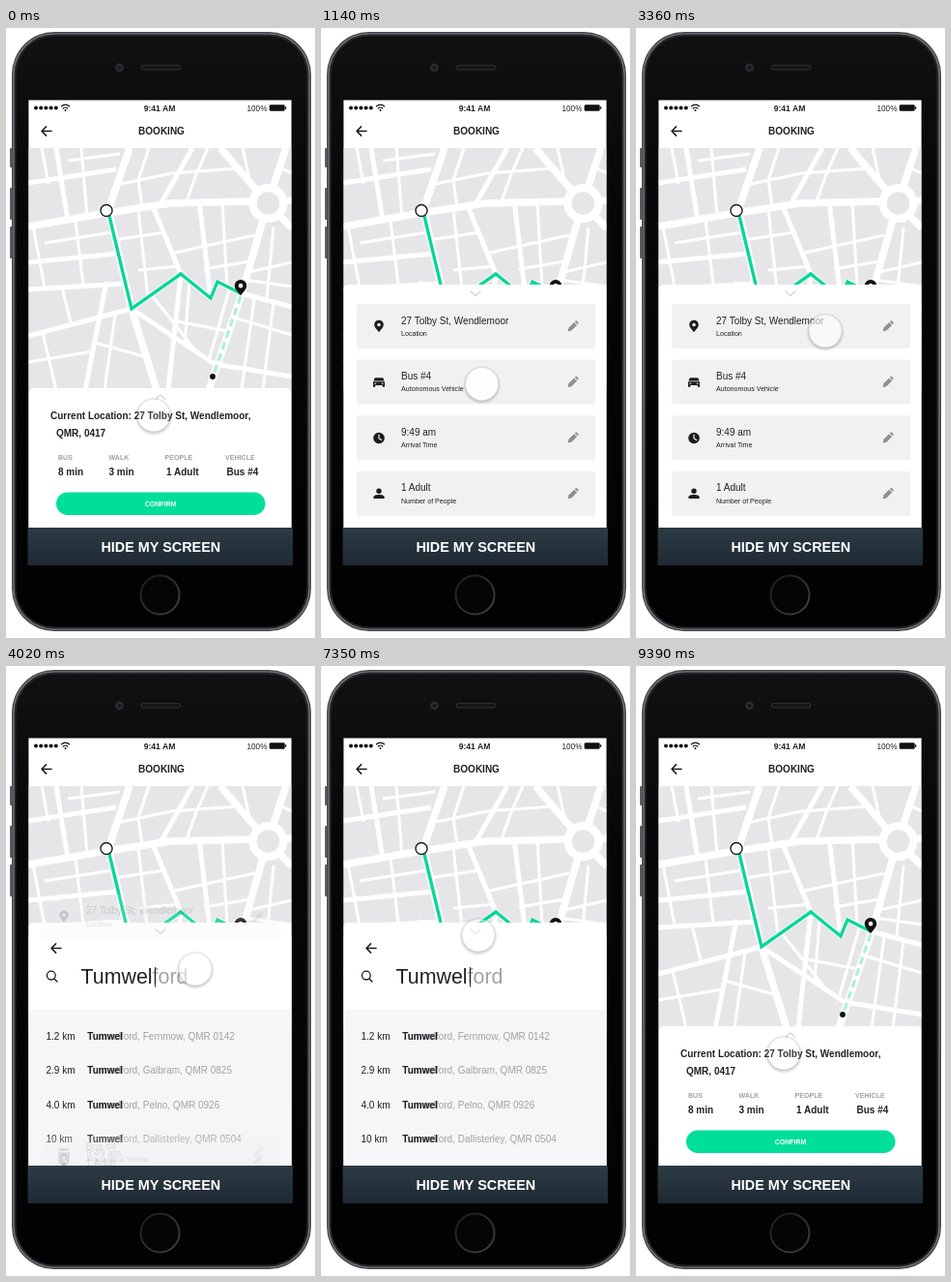
These frames come from a looping animation (320x630 px, 9.42 s). An HTML page:

```html
<!DOCTYPE html>
<html lang="en">
<head>
<meta charset="utf-8">
<title>Booking</title>
<style>
  html, body { margin: 0; width: 100%; height: 100%; overflow: hidden; background: #fff; }
  svg { display: block; width: 100vw; height: 100vh; }
  text { font-family: "Liberation Sans", Arial, sans-serif; font-size: 10px; fill: #1f2124; white-space: pre; }
  .b { font-weight: 700; }
  .s { font-size: 7.1px; }
  .g { fill: #a2a2a6; }
  .m { text-anchor: middle; }
  .line { fill: none; stroke-linecap: round; stroke-linejoin: round; }
  .road { fill: none; stroke: #fff; stroke-linejoin: round; }
</style>
</head>
<body>
<svg viewBox="0 0 320 630" preserveAspectRatio="none">
  <defs>
    <linearGradient id="body" x2="0" y2="1">
      <stop offset="0" stop-color="#111112"/><stop offset=".3" stop-color="#060606"/><stop offset="1" stop-color="#020202"/>
    </linearGradient>
    <linearGradient id="bar" x2="0" y2="1">
      <stop offset="0" stop-color="#2d3b45"/><stop offset="1" stop-color="#1e2932"/>
    </linearGradient>
    <linearGradient id="home" x2="1" y2="1">
      <stop offset="0" stop-color="#1a1a1b"/><stop offset="1" stop-color="#414144"/>
    </linearGradient>
    <radialGradient id="shade">
      <stop offset=".78" stop-color="#000" stop-opacity=".22"/><stop offset="1" stop-color="#000" stop-opacity="0"/>
    </radialGradient>
    <clipPath id="screen"><rect x="23.4" y="74.5" width="272.2" height="480"/></clipPath>
    <clipPath id="mapArea"><rect x="23.4" y="124" width="272.2" height="250"/></clipPath>
    <mask id="ring">
      <rect x="-30" y="-30" width="60" height="60" fill="#fff"/><circle r="16.8" fill="#000"/>
    </mask>

    <path id="pin" d="M0 6C-2.8 2.4-4.8.4-4.8-1.8A4.8 4.8 0 0 1 4.8-1.8C4.8.4 2.8 2.4 0 6ZM0-3.6A1.8 1.8 0 1 0 0 0A1.8 1.8 0 1 0 0-3.6Z" fill-rule="evenodd"/>
    <g id="car">
      <path d="M-3.6-4.6H3.6Q4.6-4.6 5-2.8L6-.2V4.8H3.8V3.2H-3.8V4.8H-6V-.2L-5-2.8Q-4.6-4.6-3.6-4.6Z"/>
      <path d="M-6.4-1.5H6.4V-.6H-6.4Z M-4.6.8H-2.8V1.8H-4.6Z M2.8.8H4.6V1.8H2.8Z" fill="#f1f1f1"/>
    </g>
    <g id="clock"><circle r="5.8"/><path class="line" d="M0-3.4V.3L2.6 2" stroke="#f1f1f1" stroke-width="1.2"/></g>
    <g id="person"><circle cy="-2.8" r="2.7"/><path d="M-5.6 5V3.4C-5.6.2 5.6.2 5.6 3.4V5Z"/></g>
    <g id="pencil" fill="#8f8f93">
      <path d="M-5.8 5.8L-5 1.8L1.2-4.4L4.4-1.2L-1.8 5Z"/><path d="M2-5.2L3-6.1Q3.7-6.5 4.4-6L6-4.4Q6.5-3.7 6-3L5.2-2Z"/>
    </g>
    <path id="back" class="line" d="M5 0H-5M-.4-4.6L-5 0L-.4 4.6" stroke="#1c1c1e" stroke-width="1.5"/>
  </defs>

  <!-- handset -->
  <g fill="#5b5d63">
    <rect x="4" y="124" width="4" height="20" rx="1"/>
    <rect x="4" y="165" width="4" height="33" rx="1"/>
    <rect x="4" y="205" width="4" height="33" rx="1"/>
  </g>
  <rect x="6" y="4" width="310" height="619" rx="44" fill="#46484d"/>
  <rect x="8" y="6" width="306" height="615" rx="42" fill="#26272a" stroke="#77797f" stroke-width="1.2"/>
  <rect x="10.5" y="8.5" width="301" height="610" rx="39.5" fill="url(#body)"/>
  <circle cx="117.5" cy="41" r="4.4" fill="#2b2c2f"/><circle cx="117.5" cy="41" r="2" fill="#17181b"/>
  <rect x="140" y="38.6" width="41" height="4.4" rx="2.2" fill="#151516" stroke="#3a3b3e" stroke-width=".8"/>
  <circle cx="159.5" cy="585.5" r="20" fill="#050506" stroke="url(#home)" stroke-width="2"/>

  <g clip-path="url(#screen)">
    <rect x="23" y="74" width="273" height="481" fill="#fff"/>

    <g clip-path="url(#mapArea)">
      <rect x="23" y="124" width="273" height="250" fill="#e6e6e9"/>
      <path class="road" stroke-width="7.5" d="M23 205L104 191L170 181L255 179M128 124L106 188L130 290L156 374M271 181L244 275L210 374M222 124L271 181L290 124M271 181L296 178M271 181L296 207"/>
      <path class="road" stroke-width="5" d="M130 290L181 254L212 279L219 262L243 274L296 288M23 242L116 233M23 270L125 264M130 290L23 318M52 124L64 199M82 374L104 262M160 182L193 124M152 184L181 254L168 374M200 178L212 279M23 160L114 146M130 290L216 347L296 360"/>
      <path class="road" stroke-width="3" d="M37 124L44 161M78 124L84 195M64 137L118 130M28 205L40 268M72 199L80 265M40 222L110 211M58 268L68 308M38 315L52 374M23 345L90 334M92 325L146 340M113 296L102 374"/>
      <path class="road" stroke-width="3" d="M119 161L172 150L240 145M148 124L137 157L141 185M209 124L197 151L187 179M112 219L164 211M175 232L257 214M137 187L147 279M224 179L229 267M137 250L180 246M205 249L252 241"/>
      <path class="road" stroke-width="3" d="M151 276L196 333M190 262L185 327M231 271L210 343M177 303L230 313M247 260L296 267M236 299L296 317M257 280L244 374M277 284L266 374M277 206L270 280M252 252L296 242M245 124L253 160M285 145L296 150"/>
      <circle cx="271.5" cy="181" r="20" fill="#fff"/><circle cx="271.5" cy="181" r="11.8" fill="#e6e6e9"/>
      <path d="M243 277L215 358" fill="none" stroke="#b4efda" stroke-width="3.5" stroke-dasharray="8 4.5"/>
      <path d="M105.5 188L130 290L181 254L212 279L219 262L243 274" fill="none" stroke="#0ad697" stroke-width="3.4"/>
      <circle cx="104" cy="188.5" r="6" fill="#fff" stroke="#1c1c1e" stroke-width="1.4"/>
      <use href="#pin" transform="translate(243 268.5) scale(1.3)" fill="#111"/>
      <circle cx="214" cy="360" r="2.9" fill="#111"/>
    </g>

    <g id="sheet">
      <rect x="23.4" width="272.2" height="320" rx="5" fill="#fff"/>
      <path id="chevron" class="line" stroke="#d3d3d6" stroke-width="1.2"/>
    </g>

    <g id="trip"></g>
    <g id="confirm">
      <rect x="52" y="479.5" width="216.5" height="23.5" rx="11.75" fill="#00df9a"/>
      <text class="b m" x="160" y="494" style="font-size:7px;fill:#fff">CONFIRM</text>
    </g>
    <g id="search"></g>
    <g id="cards"></g>

    <text class="b m" x="159" y="85.6" style="font-size:8.6px">9:41 AM</text>
    <text x="249.5" y="85.6" style="font-size:8.2px">100%</text>
    <g id="signal" fill="#111"></g>
    <path class="line" d="M57.4 80.8Q61.5 77.4 65.6 80.8M59.2 83Q61.5 81 63.8 83" stroke="#111" stroke-width="1.2"/>
    <circle cx="61.5" cy="85" r="1" fill="#111"/>
    <rect x="272.7" y="79.2" width="16" height="6.6" rx="1.4" fill="#111"/>
    <path d="M289.6 81.2V83.8" stroke="#111" stroke-width="1.4"/>
    <use href="#back" x="42" y="106.5"/>
    <text class="b m" x="161" y="109.6">BOOKING</text>
  </g>

  <rect x="22.5" y="516" width="274.5" height="39" rx="1" fill="url(#bar)"/>
  <text class="b m" x="160.3" y="541" style="font-size:14.4px;fill:#fff">HIDE MY SCREEN</text>

  <g id="touch">
    <circle cy="1.2" r="20" fill="url(#shade)" mask="url(#ring)"/>
    <circle id="disc" r="17" fill="#fff" stroke="#bbb" stroke-opacity=".5" stroke-width=".6"/>
  </g>
</svg>

<script>
const LOOP = 9420;
const OPEN = 120, SEARCH = 3470, CLOSE = 7960, SLIDE = 1000;
const TOP_LOW = 372, TOP_HIGH = 265;

const $ = id => document.getElementById(id);
const text = (x, y, str, cls = "") => `<text x="${x}" y="${y}" class="${cls}">${str}</text>`;
const clamp = v => Math.min(1, Math.max(0, v));
const mix = (a, b, k) => a + (b - a) * k;
const move = (el, x, y) => el.setAttribute("transform", `translate(${x} ${y})`);
const fade = (el, k) => el.setAttribute("opacity", clamp(k));

// Standard "ease" curve: bezier (.25,.1) (.25,1)
function ease(x) {
  if (x <= 0) return 0;
  if (x >= 1) return 1;
  const bez = (u, a, b) => 3 * a * u * (1 - u) ** 2 + 3 * b * u * u * (1 - u) + u ** 3;
  let lo = 0, hi = 1;
  for (let i = 0; i < 24; i++) {
    const mid = (lo + hi) / 2;
    if (bez(mid, .25, .25) < x) lo = mid; else hi = mid;
  }
  return bez(lo, .1, 1);
}

$("signal").innerHTML = [0, 1, 2, 3, 4]
  .map(i => `<circle cx="${31 + i * 5.2}" cy="82.5" r="2"/>`).join("");

const facts = [
  [54, "BUS", 54, "8 min"], [106.5, "WALK", 106.5, "3 min"],
  [164.5, "PEOPLE", 166, "1 Adult"], [227, "VEHICLE", 228.5, "Bus #4"]
];
$("trip").innerHTML =
  text(46, 403.5, "Current Location: 27 Tolby St, Wendlemoor,", "b") +
  text(52, 422.3, "QMR, 0417", "b") +
  facts.map(([lx, label, vx, value]) =>
    text(lx, 445.7, label, "b s g") + text(vx, 461.5, value, "b")).join("");

// title, caption, icon, vertical travel when search opens
const cards = [
  ["27 Tolby St, Wendlemoor", "Location", "pin", -58],
  ["Bus #4", "Autonomous Vehicle", "car", 161],
  ["9:49 am", "Arrival Time", "clock", 102],
  ["1 Adult", "Number of People", "person", 45]
];
$("cards").innerHTML = cards.map(([title, caption, icon]) => `<g>
  <rect x="37" width="247" height="46" rx="2.5" fill="#f1f1f1"/>
  <use href="#${icon}" x="60" y="23.3" fill="#1c1c1e"/>
  ${text(83, 20.6, title)}${text(83, 32.8, caption, "s")}
  <use href="#pencil" transform="translate(261 23) scale(.92)"/></g>`).join("");
const cardEls = [...$("cards").children];

const typed = "Tumwel", rest = "ford";
const places = [
  ["1.2 km", "Fernmow, QMR 0142"], ["2.9 km", "Galbram, QMR 0825"],
  ["4.0 km", "Pelno, QMR 0926"], ["10 km", "Dallisterley, QMR 0504"]
];
$("search").innerHTML = `
  <rect x="23" y="279" width="273" height="76" fill="#fff"/>
  <rect x="23" y="355" width="273" height="170" fill="#f6f5f8"/>
  <use href="#back" x="52" y="291.5"/>
  <path class="line" d="M50.2 323.2L53 326" stroke="#1c1c1e" stroke-width="1.4"/>
  <circle cx="46.8" cy="319.6" r="4.4" fill="none" stroke="#1c1c1e" stroke-width="1.3"/>
  <text x="77.5" y="328.4" style="font-size:21.4px">${typed}<tspan fill="#a2a2a6">${rest}</tspan></text>
  <path d="M154.6 311V331.5" stroke="#1c1c1e"/>` +
  places.map(([far, place], i) => {
    const y = 386 + i * 35.3;
    return text(41.5, y, far) + text(84.3, y, `${typed}${rest}, ${place}`, "g") + text(84.3, y, typed, "b");
  }).join("");

// time, x, y, whiteness of the disc
const touchPath = [
  [0, 153, 400, .12], [200, 153, 400, .12], [690, 157, 380, .9], [1860, 182, 348, .9],
  [2700, 196, 313, .6], [4900, 196, 313, .6], [6500, 163, 278, .4], [8560, 163, 278, .4],
  [9300, 153, 400, .12], [LOOP, 153, 400, .12]
];
function touchAt(t) {
  const i = touchPath.findIndex(p => p[0] > t);
  const from = touchPath[i - 1], to = touchPath[i];
  let k = (t - from[0]) / (to[0] - from[0]);
  if (from[0] >= 4900) k = k * k * (3 - 2 * k);
  return [1, 2, 3].map(n => mix(from[n], to[n], k));
}

function draw(t) {
  const opened = ease((t - OPEN) / SLIDE);
  const closed = ease((t - CLOSE) / SLIDE);
  const found = ease((t - SEARCH) / SLIDE);
  const closing = t > CLOSE;
  const up = closing ? 1 - closed : opened;
  const top = mix(TOP_LOW, TOP_HIGH, up);

  move($("sheet"), 0, top);
  const down = t > OPEN + 120 && t < CLOSE + 850;
  $("chevron").setAttribute("d", down ? "M155 7L160 11.5L165 7" : "M155 11.5L160 7L165 11.5");

  const shown = (closing ? 1.3 : 1) - 2 * up;
  move($("trip"), 0, -86 * up);
  fade($("trip"), shown);
  fade($("confirm"), shown);

  fade($("search"), closing ? 1 - closed * 2.2 : found * 2);
  move($("search"), 0, closing ? top - TOP_HIGH : 0);

  cardEls.forEach((el, i) => {
    move(el, 0, 285 + i * 57.6 + 235 * (1 - opened) + cards[i][3] * found);
    fade(el, t < OPEN ? 0 : 1 - found);
  });

  const [x, y, white] = touchAt(t);
  move($("touch"), x, y);
  $("disc").setAttribute("fill-opacity", white);
}

const start = performance.now();
function tick() {
  draw((performance.now() - start) % LOOP);
  requestAnimationFrame(tick);
}
tick();
</script>
</body>
</html>
```
